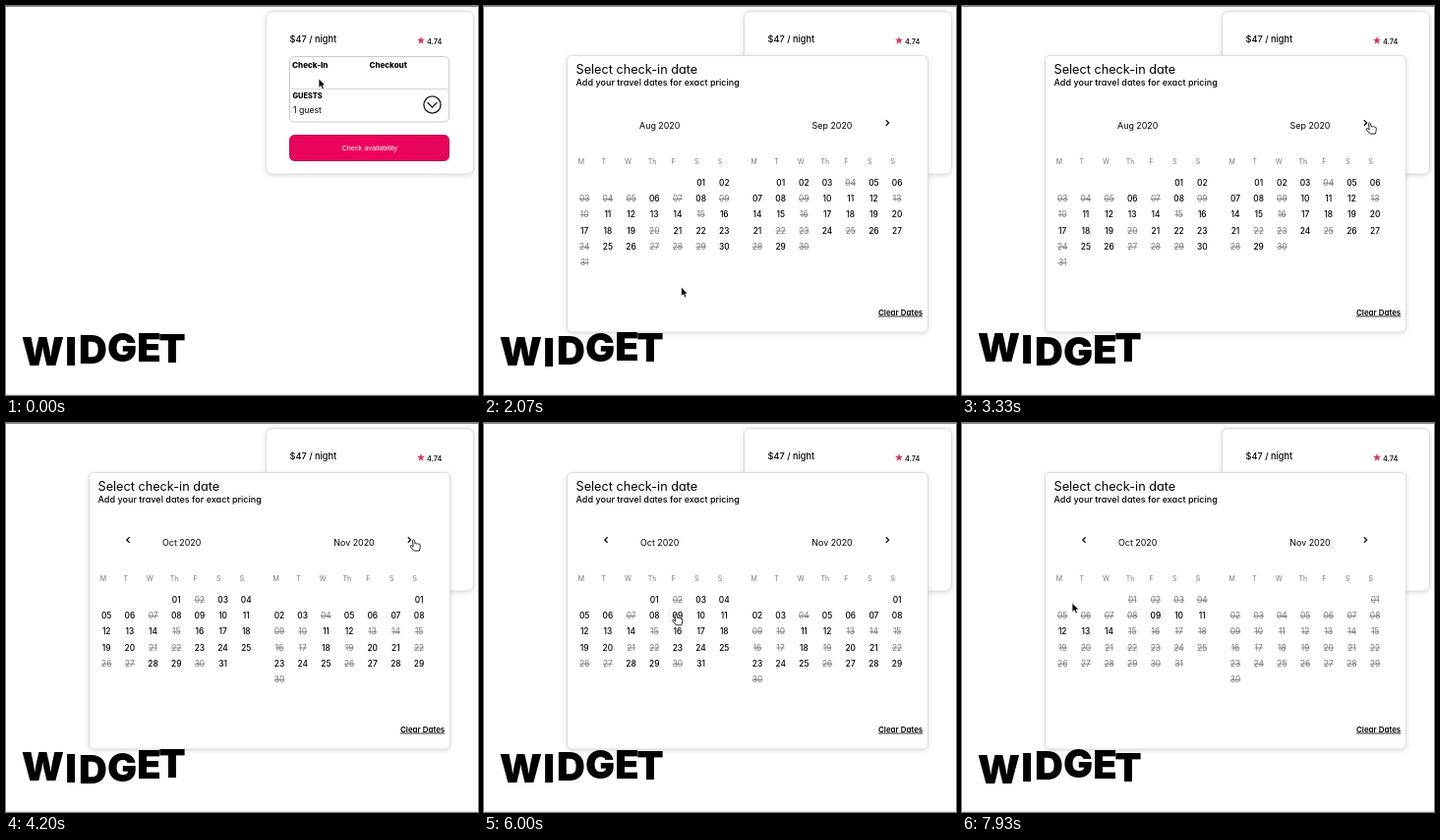
An HTML page that plays this animation: 480x396 px, repeating every 8000 ms.

```html
<!DOCTYPE html>
<html lang="en">
<head>
<meta charset="utf-8">
<title>Booking widget</title>
<style>
  html, body { margin: 0; width: 100%; height: 100%; overflow: hidden; background: #fff; }
  svg { display: block; font-family: Inter, "Open Sans", sans-serif; font-feature-settings: "cv11"; }
  .panel { fill: #fff; stroke: #dcdcdc; filter: drop-shadow(0 1px 2.5px #0002); }
  .b { font-weight: 800; }
  .m { font-weight: 500; }
  .mid { text-anchor: middle; }
  .weekday { font-size: 7px; fill: #777; }
  .day { font-size: 8.4px; font-weight: 500; text-anchor: middle; }
  .off { fill: #777; font-weight: 400; text-decoration: line-through; }
  .line { fill: none; stroke: #111; stroke-width: 1.3; }
  #word { font-size: 40px; font-weight: 900; text-anchor: middle; }
</style>
</head>
<body>
<svg width="480" height="396" viewBox="0 0 480 396">
  <path d="M0 .5H480" stroke="#8a8a8a"/>
  <path d="M0 395.5H480" stroke="#e4e4e4"/>
  <defs>
    <linearGradient id="pink">
      <stop offset="0" stop-color="#e6045c"/>
      <stop offset=".5" stop-color="#ee025e"/>
      <stop offset="1" stop-color="#e4055a"/>
    </linearGradient>
  </defs>

  <rect class="panel" x="264.5" y="5.5" width="211" height="165.5" rx="6"/>
  <text class="m" x="288.5" y="36.8" font-size="9.2">$47 / night</text>
  <path id="star" fill="#cf3a5e"/>
  <text class="m" x="428" y="38.8" font-size="7.4">4.74</text>
  <rect x="288.5" y="51.5" width="162" height="66.5" rx="5" fill="none" stroke="#c8c8c8"/>
  <path d="M290 84.5H449" stroke="#d4d4d4"/>
  <text class="b" x="291" y="62.5" font-size="8.1">Check-In</text>
  <text class="b" x="369.5" y="62.5" font-size="8">Checkout</text>
  <text class="b" x="291.5" y="94" font-size="7.4">GUESTS</text>
  <text x="292" y="108.5" font-size="8.7">1 guest</text>
  <circle class="line" cx="433.5" cy="100.5" r="8.6"/>
  <path class="line" d="M428.7 98.3l4.8 4.8l4.8-4.8"/>
  <rect x="288.5" y="131.5" width="162" height="26" rx="5" fill="url(#pink)" stroke="#b80c4b"/>
  <text class="mid" x="369.7" y="147.4" font-size="7.3" fill="#fff"
    style="font-family: 'Liberation Sans', Arial, sans-serif">Check availability</text>

  <g id="popup">
    <rect class="panel" x="84.5" y="50.5" width="367" height="281.5" rx="5"/>
    <text x="93.5" y="68.9" font-size="12.7">Select check-in date</text>
    <text class="m" x="93.5" y="81.4" font-size="9.05">Add your travel dates for exact pricing</text>
    <path class="line" d="M408.8 116.2l2.8 2.8l-2.8 2.8"/>
    <text x="401" y="314.6" font-size="7.95" font-weight="600" text-decoration="underline">Clear Dates</text>
    <rect id="hover" width="22" height="15" rx="2" fill="#f7f7f7"/>
    <rect id="chosen" width="22" height="15" rx="2" fill="#f7f7f7"/>
    <g id="weekdays"></g>
    <g id="pages"></g>
  </g>

  <g id="word"></g>
  <path id="arrow" d="M0 0V9.6L2.2 7.6L3.8 11L5.5 10.2L4 7H6.9Z" fill="#000" stroke="#fff" stroke-width=".8"/>
  <path id="hand" d="M-1 .8Q0-.6 1 .8L1.6 4.2Q2.4 3.2 3.2 4.2Q4.3 3.3 5 4.5Q6.5 4 6.8 5.6L6.6 8.5L5.8 11.3H.6L-3 7.4Q-3.6 5.6-2 5.8L-.3 7.2Z"
    fill="#fff" stroke="#111" stroke-width=".9" stroke-linejoin="round"/>
</svg>
<script>
const LOOP = 8000, FPS = 15;
const OPEN = 400, NEXT = 3930, PICK = 6460;
const $ = id => document.getElementById(id);

function add(parent, tag, attrs, text = '') {
  const node = document.createElementNS('http://www.w3.org/2000/svg', tag);
  for (const key in attrs) node.setAttribute(key, attrs[key]);
  node.textContent = text;
  parent.append(node);
  return node;
}
const show = (node, on) => { node.style.display = on ? '' : 'none'; };
const moveTo = (node, x, y) => node.setAttribute('transform', `translate(${x} ${y})`);

$('star').setAttribute('d', 'M' + Array.from({ length: 10 }, (_, i) => {
  const r = i % 2 ? 1.7 : 4.3, a = i * Math.PI / 5;
  return [422 + r * Math.sin(a), 35.2 - r * Math.cos(a)];
}).join('L') + 'Z');

// Calendar
const SIDES = [102.2, 278], COL = 23.68, ROW = 16.25, TOP = 179.8;
const all = n => Array.from({ length: n }, (_, i) => i + 1);
const PAGES = [
  [
    { name: 'Aug 2020', first: 5, days: 31, off: [3, 4, 5, 7, 9, 10, 15, 20, 24, 27, 28, 29, 31] },
    { name: 'Sep 2020', first: 1, days: 30, off: [4, 9, 13, 16, 22, 23, 25, 28, 30] },
  ],
  [
    { name: 'Oct 2020', first: 3, days: 31, off: [2, 7, 15, 21, 22, 26, 27, 30] },
    { name: 'Nov 2020', first: 6, days: 30, off: [4, 9, 10, 13, 14, 15, 16, 17, 19, 22, 26, 30] },
  ],
];
PAGES.push([
  { ...PAGES[1][0], off: all(31).filter(d => d < 9 || d > 14) },
  { ...PAGES[1][1], off: all(30) },
]);

SIDES.forEach(left => ['M', 'T', 'W', 'Th', 'F', 'S', 'S'].forEach((name, i) =>
  add($('weekdays'), 'text', { x: left + i * COL - 6.5, y: 160.9, class: 'weekday' }, name)));

const pages = PAGES.map((months, page) => {
  const group = add($('pages'), 'g', {}), open = [];
  if (page) add(group, 'path', { class: 'line', d: 'M125.6 116.2l-2.8 2.8l2.8 2.8' });
  months.forEach(({ name, first, days, off }, side) => {
    add(group, 'text', { x: [178.7, 354][side], y: 125, class: 'mid', 'font-size': 8.9 }, name);
    for (const day of all(days)) {
      const slot = first + day - 1, struck = off.includes(day);
      const x = SIDES[side] + slot % 7 * COL, y = TOP + Math.floor(slot / 7) * ROW;
      add(group, 'text', { x, y: y + 3.1, class: struck ? 'day off' : 'day' }, String(day).padStart(2, '0'));
      if (!struck) open.push({ x, y });
    }
  });
  return { group, open };
});
const picked = { x: SIDES[0] + 4 * COL, y: TOP + ROW };
const placeCell = (node, { x, y }) => moveTo(node, x - 11, y - 7.5);
placeCell($('chosen'), picked);

// Pointer path: time, x, y
const PATH = [
  [0, 318, 73.8], [1130, 318, 73.8], [1730, 200.5, 286], [2730, 200.5, 286],
  [3130, 430, 129], [3270, 414.5, 118.8], [4470, 414.5, 118.8], [5130, 357, 187.8],
  [5330, 357, 187.8], [6000, 195, 194.5], [6930, 194, 194.2], [7270, 243, 196],
  [7800, 112, 183], [LOOP, 112, 183],
];
function pointerAt(t) {
  const i = PATH.findIndex(p => p[0] > t);
  const [t0, x0, y0] = PATH[i - 1], [t1, x1, y1] = PATH[i];
  const k = (t - t0) / (t1 - t0), e = k * k * (3 - 2 * k);
  return { x: x0 + (x1 - x0) * e, y: y0 + (y1 - y0) * e };
}

// Each letter rides a wave that travels right once a second
const WAVELENGTH = 165, SWELL = 2.8, CREST = 50;
const letters = [37.3, 66, 88.5, 118, 145.5, 169].map((x, i) =>
  ({ x, node: add($('word'), 'text', {}, 'WIDGET'[i]) }));

function waveWord(t) {
  for (const { x, node } of letters) {
    const phase = (x - CREST) / WAVELENGTH - t / 1000;
    moveTo(node, x, 364 + SWELL * Math.cos(2 * Math.PI * phase));
  }
}

function render(t) {
  const opened = t >= OPEN, page = t < NEXT ? 0 : t < PICK ? 1 : 2;
  const pos = pointerAt(t);
  const cell = opened && pages[page].open.find(c =>
    Math.abs(c.x - pos.x) < COL / 2 && Math.abs(c.y - pos.y) < ROW / 2 + .2);
  const onPick = page === 2 && cell && Math.hypot(cell.x - picked.x, cell.y - picked.y) < 1;
  const onNext = opened && Math.abs(pos.x - 411) < 7 && Math.abs(pos.y - 119) < 6;
  const hand = onNext || Boolean(cell && !onPick);

  show($('popup'), opened);
  pages.forEach((p, i) => show(p.group, i === page));
  show($('chosen'), page === 2);
  show($('hover'), cell);
  if (cell) placeCell($('hover'), cell);
  show($('hand'), hand);
  show($('arrow'), !hand);
  moveTo($(hand ? 'hand' : 'arrow'), pos.x, pos.y);
  waveWord(t);
}

const start = performance.now();
function tick() {
  const t = (performance.now() - start) % LOOP;
  const step = Math.floor(t * FPS / 1000 + .06) % (LOOP * FPS / 1000);
  render(step * 1000 / FPS);
  requestAnimationFrame(tick);
}
tick();
</script>
</body>
</html>
```
